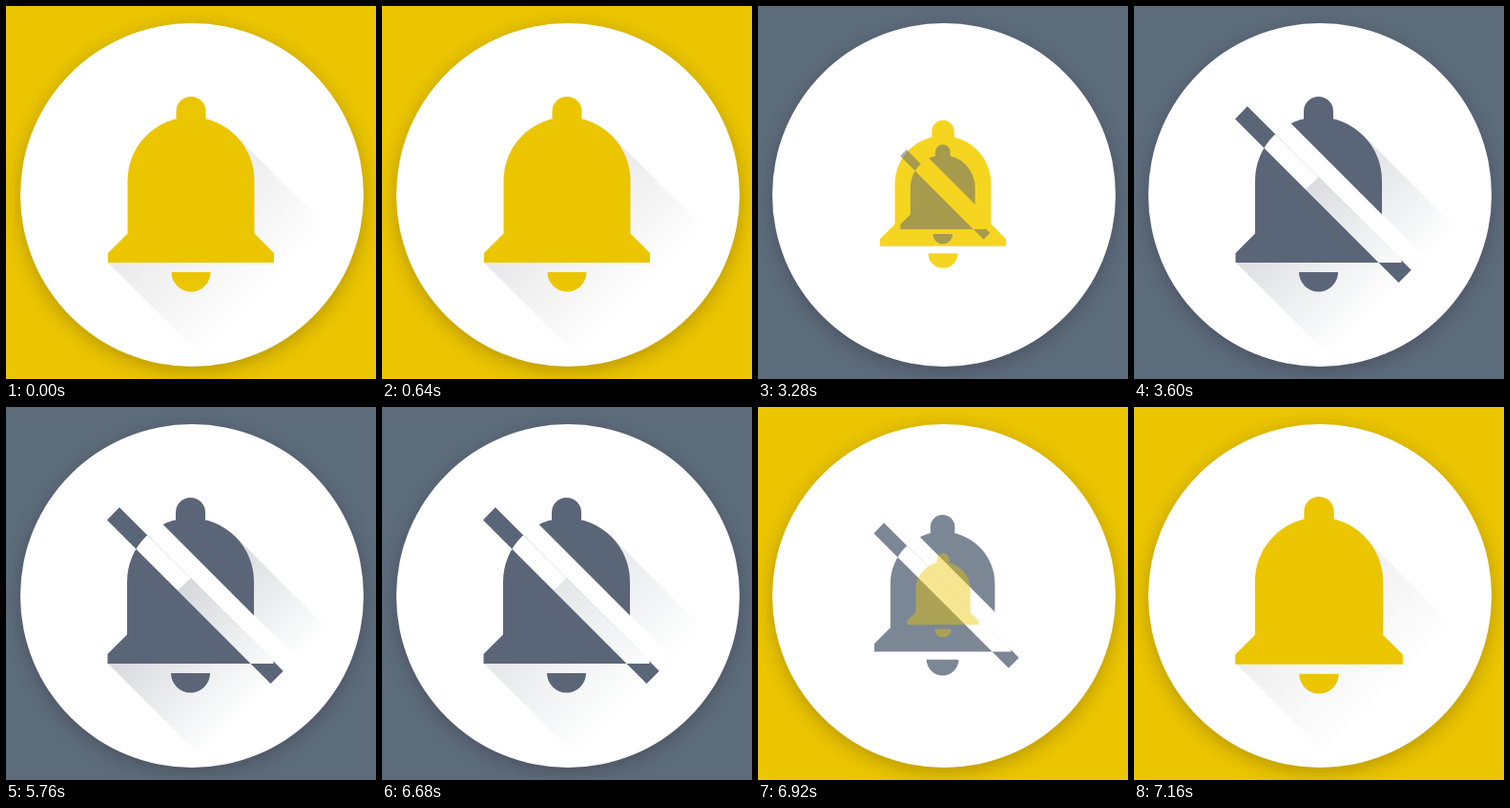
Recreate the animation shown at these times as an HTML page with a canvas. Size 388 by 391 pixels, loop 7.2 s.

```html
<!DOCTYPE html>
<html lang="en">
<head>
<meta charset="utf-8">
<title>Bell toggle</title>
<style>
  html, body { margin: 0; width: 100%; height: 100%; overflow: hidden; background: #ebc500; }
  canvas { display: block; width: 388px; height: 391px; }
</style>
</head>
<body>
<canvas id="stage" width="388" height="391"></canvas>
<script>
const ctx = document.getElementById('stage').getContext('2d');
const LOOP = 7200;
const CENTER = { x: 194, y: 197.5 };

const bell = new Path2D(
  'M178.5 122V110.5a15.5 15.5 0 0 1 31 0V122Z' +
  'M127.5 183a66.5 66.5 0 0 1 133 0V238.5L281 259V269H107V259L127.5 238.5Z' +
  'M173.5 279H214.5A20.5 20.5 0 0 1 173.5 279Z');
const slash = new Path2D('M119.5 105L106.5 118.5L278 290L291.5 276.5Z');
// Everything except the diagonal gap beside the slash
const outsideGap = new Path2D('M0 -14.5V500H514.5ZM0 -42H542V500Z');
const longShadow = new Path2D('M241 136L345 240L211 373L107 269V259Z');

const ring = { bg: '#ebc500', icon: [235, 197, 0], light: [246, 214, 33], shade: '40,40,55', depth: .115 };
const mute = { bg: '#5d6c7b', icon: [90, 101, 120], light: [138, 149, 162], shade: '70,82,100', depth: .22, muted: true };

const clamp = x => Math.max(0, Math.min(1, x));
const mix = (a, b, k) => `rgb(${a.map((v, i) => v + (b[i] - v) * k)})`;

function disc(x, y, radius, color) {
  ctx.fillStyle = color;
  ctx.beginPath();
  ctx.arc(x, y, radius, 0, Math.PI * 2);
  ctx.fill();
}

function drawIcon(theme, scale, color, alpha) {
  if (scale <= 0) return;
  ctx.save();
  ctx.globalAlpha = alpha;
  ctx.fillStyle = color;
  ctx.translate(CENTER.x, CENTER.y);
  ctx.scale(scale, scale);
  ctx.translate(-CENTER.x, -CENTER.y);
  if (theme.muted) {
    // One combined clip keeps overlapping parts at a single opacity
    const shape = new Path2D(bell);
    ctx.translate(-.5, 0);
    ctx.save();
    ctx.clip(outsideGap);
    shape.addPath(slash);
    ctx.fill(shape);
    ctx.restore();
  } else {
    ctx.fill(bell);
  }
  ctx.restore();
}

function drawLongShadow(theme, strength) {
  if (strength <= 0) return;
  const fade = ctx.createLinearGradient(188, 188, 286, 286);
  fade.addColorStop(0, `rgba(${theme.shade},${theme.depth * strength})`);
  fade.addColorStop(1, `rgba(${theme.shade},0)`);
  ctx.save();
  if (theme.muted) ctx.clip(outsideGap);
  ctx.fillStyle = fade;
  ctx.fill(longShadow);
  ctx.restore();
}

function drawPlate() {
  ctx.save();
  ctx.shadowColor = 'rgba(20,0,20,.24)';
  ctx.shadowBlur = 20;
  ctx.shadowOffsetY = 5;
  disc(195, 198, 180, '#fff');
  ctx.restore();
}

// progress runs 0..1 through a switch and beyond 1 while the icon rests
function drawSwitch(from, to, progress) {
  const grow = (progress - .2) / .7;
  const shrink = clamp(1.7 * Math.max(0, progress - .18) ** 2);

  ctx.fillStyle = from.bg;
  ctx.fillRect(0, 0, 388, 391);
  if (grow > 0) disc(194, 197, Math.min(300, 180 + 340 * grow), to.bg);
  drawPlate();

  drawLongShadow(from, clamp(1 - progress / .2));
  drawLongShadow(to, 1 - Math.exp(-14 * Math.max(0, progress - .85)));

  if (grow < 1) drawIcon(from, 1 - shrink, mix(from.icon, from.light, clamp(shrink * 4)), 1);
  const overshoot = progress < 1 ? .012 * Math.sin(Math.PI * (progress - .9) / .1) : 0;
  drawIcon(to, grow < 1 ? grow : 1 + overshoot, mix(to.icon, to.icon, 0), clamp(grow));
}

function render(now) {
  const t = now % LOOP;
  if (t >= 2880 && t < 6640) drawSwitch(ring, mute, (t - 2880) / 720);
  else drawSwitch(mute, ring, ((t - 6640 + LOOP) % LOOP) / 560);
}

const start = performance.now();
function tick() {
  render(performance.now() - start);
  requestAnimationFrame(tick);
}
tick();
</script>
</body>
</html>
```
